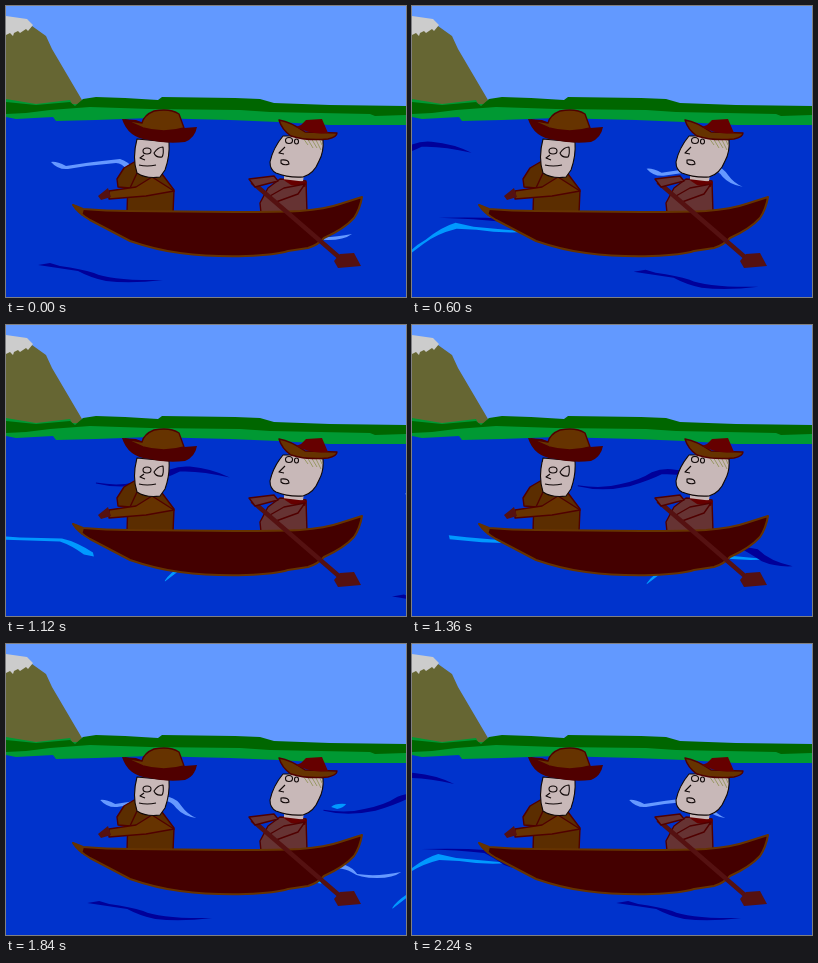
An HTML page that plays this animation: 400x291 px, repeating every 2280 ms.

```html
<!DOCTYPE html>
<html lang="en">
<head>
<meta charset="utf-8">
<title>Canoe</title>
<style>
  html, body { margin: 0; width: 100%; height: 100%; overflow: hidden; background: #03c; }
  svg { display: block; width: 400px; height: 291px; }
  .ink { fill: none; stroke: #100808; stroke-width: 1.1; stroke-linejoin: round; }
  .skin { fill: #c8b8b8; }
  .seam { stroke: #500000; stroke-width: 1.4; stroke-linejoin: round; }
  .light { fill: #69f; }
  .cyan { fill: #09f; }
  .dark { fill: #009; }
  .brown { fill: #5b2d00; }
  .plum { fill: #633; }
  .wood { fill: #511; }
  .shaft { fill: none; stroke: #511; stroke-width: 4.5; }
</style>
</head>
<body>
<svg viewBox="0 0 400 291">
  <defs>
    <g id="waves">
      <path class="cyan" d="M-195 243Q-190 235 -176 227Q-160 214 -146 210L-128 214L-74 219Q-100 221 -125 217L-145 216Q-165 221 -178 231L-195 244Z"/>
      <path class="cyan" d="M-393 195L-375 197L-340 200L-298 201Q-284 204 -267 215L-266 219L-276 217Q-288 208 -300 204L-360 202L-392 199Z"/>
      <path class="cyan" d="M276 163Q280 159 291 160Q288 164 282 165Z"/>
      <path class="dark" d="M32 259L44 257L54 260Q75 263 88 267Q105 275 157 274Q125 278 100 275Q85 272 72 265Q52 262 32 259Z"/>
      <path class="dark" d="M-163 205Q-120 204 -100 206L-84 209Q-72 221 -49 226Q-66 227 -80 221Q-92 213 -100 209Q-125 206 -163 205Z"/>
      <path class="dark" d="M-264 145Q-240 149 -222 144Q-202 140 -190 132Q-180 128 -170 129Q-148 131 -130 140Q-160 133 -180 134Q-192 140 -212 146Q-240 152 -264 146Z"/>
      <path class="light" d="M45 156Q50 155 60 160Q85 156 96 155L114 153Q122 155 127 163Q132 170 141 174Q128 172 121 164Q116 157 110 157Q85 159 62 163Q52 164 45 156Z"/>
      <path class="light" d="M236 232Q256 228 267 224Q280 218 290 221Q298 224 302 230Q322 233 346 228Q338 234 322 234Q304 234 296 228Q286 222 274 226Q256 232 236 232Z"/>
    </g>
  </defs>

  <rect width="400" height="125" fill="#6299ff"/>
  <rect y="110" width="400" height="181" fill="#03c"/>
  <path fill="#663" d="M0 26L26 20L40 30L46 43L76 94L70 102H0Z"/>
  <path fill="#ccc" d="M0 10L14 12L21 13L27 19L22 25L20 23L14 27L12 25L8 27L7 30L4 27L0 29Z"/>
  <path fill="#093" d="M0 93L30 98L64 94L66 98L400 106V119L324 119L272 116L224 114L144 112L90 114L50 115L47 111L10 113L0 111Z"/>
  <path fill="#060" d="M0 96L30 99L64 96L69 100L77 93L90 91L119 92L152 94L156 91L229 92L254 93L268 97L324 99L400 100V109L369 110L364 108L264 106L234 104L144 103L84 101L44 104L20 107L0 108Z"/>

  <use id="swell1" href="#waves"/>
  <use id="swell2" href="#waves"/>

  <!-- left paddler -->
  <path class="seam brown" d="M128 158L132 166L156 168L168 184L167 207H121L122 174Z"/>
  <g class="reach">
    <path class="seam brown" d="M130 155L118 162L111 173L112 181L124 182L131 167Z"/>
    <path class="seam" fill="#630" d="M103 185L130 181L146 171L168 185L140 190L103 193Z"/>
    <path class="wood" d="M92 190L102 182L105 191L95 194Z"/>
  </g>
  <g class="pull">
    <path class="seam brown" d="M130 155L118 161L93 173L92 178L101 180L124 171Z"/>
    <path class="shaft" style="stroke-width:3.500" d="M74 178L122 183"/>
    <path class="wood" d="M61 176L72 173L80 178L70 181Z"/>
    <path class="seam" fill="none" d="M122 182L146 186L168 185L146 190L122 187M147 178L167 185"/>
  </g>
  <path class="ink skin" d="M131 133L163 136Q164 150 159 164L154 171Q140 173 131 167Q126 152 131 133Z"/>
  <g class="ink">
    <ellipse cx="141" cy="145" rx="4" ry="3"/>
    <path d="M148 147Q152 141 157 141Q158 148 156 151Q150 152 148 147ZM138 149L134 152L139 154M133 159Q141 161 150 159"/>
  </g>
  <path fill="#500000" d="M116 113L130 114Q155 125 178 122L191 121Q189 132 179 136Q160 138 143 134Q122 132 116 113Z"/>
  <path class="seam" fill="#630" d="M119 114L136 117Q138 109 148 105Q164 102 173 108L178 122Q158 128 137 122Z"/>

  <!-- right paddler -->
  <path class="seam plum" d="M255 207L254 197L262 182L274 173L300 175L301 207Z"/>
  <path class="skin" d="M278 169H298L297 175Q287 178 278 174Z"/>
  <path class="ink skin" d="M277 130Q267 142 264 156Q264 164 270 167Q282 172 297 171Q308 168 313 155Q318 146 317 134L300 130Z"/>
  <path fill="none" stroke="#996" d="M297 132L302 139M301 132L307 142M305 132L311 142M309 132L315 144M313 132L316 139"/>
  <g class="ink">
    <ellipse cx="283" cy="134.500" rx="3.500" ry="3"/>
    <ellipse cx="290.500" cy="135.500" rx="2" ry="2.500"/>
    <path d="M279 141L273 147L278 148M275 154Q283 153 283 158Q278 160 275 157Z"/>
  </g>
  <path class="seam" fill="#630" d="M273 114Q285 116 299 126L331 127Q331 131 322 133Q300 135 285 130Q276 124 273 114Z"/>
  <path fill="#600" d="M290 121L295 119L300 114L316 113L322 127Q305 129 290 121Z"/>

  <path fill="#440000" stroke="#630" stroke-width="2" stroke-linejoin="round" d="M67 199L77 203Q100 205 124 205L229 206Q275 206 294 205Q320 203 334 198L356 191Q354 203 348 212Q338 223 318 232Q312 239 302 242L282 245Q270 249 240 250Q205 251 174 247Q150 244 124 235L84 214Q72 207 67 199Z"/>
  <path fill="#630" d="M66 198L78 203L76 210Z"/>

  <g class="reach">
    <path fill="#600" d="M276 173L301 176L299 181L285 179Z"/>
    <path class="seam plum" d="M264 190L278 182L299 178L292 188L270 196Z"/>
    <path class="shaft" d="M246 176L334 252"/>
    <path class="seam plum" d="M243 173L268 170L272 175L249 181Z"/>
    <path class="wood" d="M328 255L334 248L348 247L355 260L332 262Z"/>
  </g>
  <g class="pull">
    <path class="shaft" d="M250 187L199 221"/>
    <path class="seam plum" d="M239 186L264 181L300 174L297 182L256 193Z"/>
    <path class="seam" fill="none" d="M258 187L299 178M272 191L269 204"/>
    <path class="wood" d="M168 242L184 223L194 219L205 220L201 231L190 242L176 243Z"/>
  </g>
</svg>
<script>
  const STEP = 40, LOOP = 2280, STROKE = 7, RESTART = 42, FADE = 54;
  const $ = id => document.getElementById(id);
  const show = (el, on) => { el.style.display = on ? '' : 'none'; };
  const move = (el, x, y) => el.setAttribute('transform', `translate(${x.toFixed(2)} ${y.toFixed(2)})`);
  const reach = document.querySelectorAll('.reach');
  const pull = document.querySelectorAll('.pull');
  const start = performance.now();

  function draw() {
    const time = (performance.now() - start) % LOOP;
    const n = Math.floor(time / STEP);
    const pulling = Math.floor(n / STROKE) % 2 === 1;
    reach.forEach(el => show(el, !pulling));
    pull.forEach(el => show(el, pulling));

    // the first swell sinks as it passes; the second runs level
    show($('swell1'), n <= FADE);
    move($('swell1'), 12.64 * n, 0.45 * n);
    show($('swell2'), n >= RESTART);
    move($('swell2'), 12.3 * (n - RESTART), 0);
    requestAnimationFrame(draw);
  }
  draw();
</script>
</body>
</html>
```
